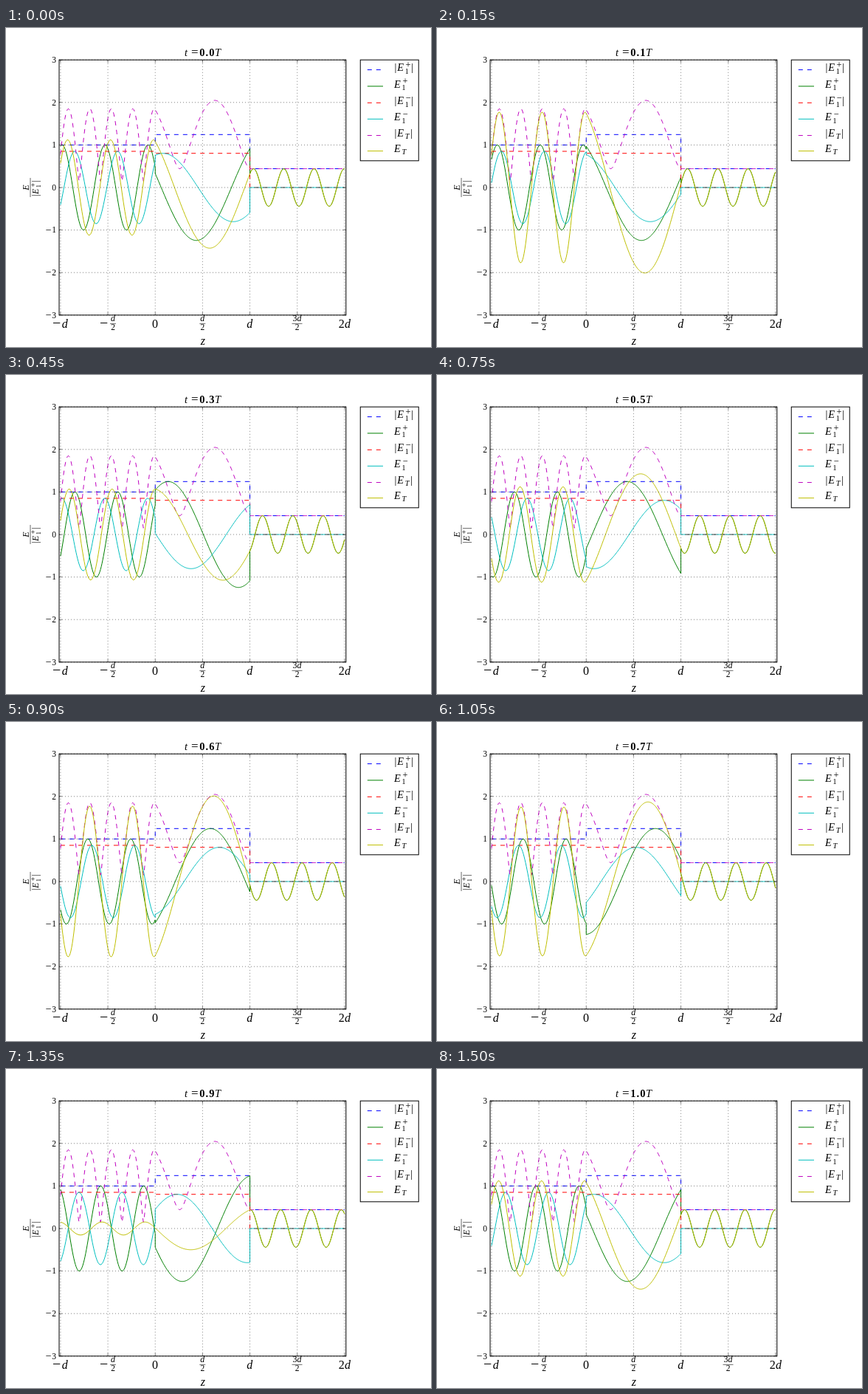
These frames come from a looping animation (576x432 px, 1.65 s). An HTML page:

```html
<!DOCTYPE html>
<html lang="en">
<head>
<meta charset="utf-8">
<title>Waves in three layers</title>
<style>
html, body { margin: 0; width: 100%; height: 100%; overflow: hidden; background: #fff; }
svg { display: block; }
text { font-family: "Liberation Serif", "Times New Roman", serif; fill: #000; }
.i { font-style: italic; }
.b { font-weight: bold; }
</style>
</head>
<body>
<svg id="stage" width="576" height="432" viewBox="0 0 576 432"></svg>
<script>
const stage = document.getElementById('stage');
const TAU = 2 * Math.PI;
const STEP = 150, STEPS = 11;

function add(tag, attrs, parent = stage) {
  const el = document.createElementNS('http://www.w3.org/2000/svg', tag);
  for (const k in attrs) el.setAttribute(k, attrs[k]);
  parent.appendChild(el);
  return el;
}
function text(x, y, str, size, cls = '', anchor = 'start', parent = stage) {
  const el = add('text', { x, y, 'font-size': size, class: cls, 'text-anchor': anchor }, parent);
  el.textContent = str;
  return el;
}
function stroke(d, color, width = 1, dash = 'none') {
  return add('path', { d, fill: 'none', stroke: color, 'stroke-width': width, 'stroke-dasharray': dash });
}

const px = z => 202.24 + 128.32 * z;
const py = v => 216 - 57.6 * v;

// Wave numbers of the layers and matching at z = 0 and z = d
const k1 = TAU * 2.206, k2 = 4.235, k3 = TAU * 3.126, phase = 0.745;
const r = k3 / k2, s = k1 / k2;
const C = Math.cos(k2), S = Math.sin(k2);
const wave = (re, im) => ({ a: Math.hypot(re, im), p: Math.atan2(im, re) + phase });
const layers = [
  { z: -1, ref: 0, k: k1,
    f: wave(C * (1 + r / s) / 2, S * (r + 1 / s) / 2),
    g: wave(C * (1 - r / s) / 2, S * (r - 1 / s) / 2) },
  { z: 0, ref: 1, k: k2, f: wave((1 + r) / 2, 0), g: wave((1 - r) / 2, 0) },
  { z: 1, ref: 1, k: k3, f: wave(1, 0), g: wave(0, 0) }
];
const unit = 1 / layers[0].f.a;

const fwd = (l, z, t) => unit * l.f.a * Math.cos(TAU * t - l.k * (z - l.ref) + l.f.p);
const back = (l, z, t) => unit * l.g.a * Math.cos(TAU * t + l.k * (z - l.ref) + l.g.p);
const total = (l, z, t) => fwd(l, z, t) + back(l, z, t);
const fwdAbs = l => unit * l.f.a;
const backAbs = l => unit * l.g.a;
const totalAbs = (l, z) => unit * Math.sqrt(Math.max(0, l.f.a ** 2 + l.g.a ** 2 +
  2 * l.f.a * l.g.a * Math.cos(2 * l.k * (z - l.ref) + l.g.p - l.f.p)));

function curve(fn, t, n = 128) {
  const pts = [];
  for (const l of layers) {
    for (let i = 0; i <= n; i++) {
      const z = l.z + i / n;
      pts.push(px(z).toFixed(2) + ' ' + py(fn(l, z, t)).toFixed(2));
    }
  }
  return 'M' + pts.join('L');
}

const BLUE = '#00f', GREEN = '#008000', RED = '#f00';
const CYAN = '#00bfbf', MAGENTA = '#bf00bf', YELLOW = '#bfbf00';
const moving = [];
const live = (fn, color) => moving.push({ fn, el: stroke('', color) });
const still = (fn, color, n) => stroke(curve(fn, 0, n), color, 1, '6 6');

add('rect', { width: 576, height: 432, fill: '#fff' });
still(fwdAbs, BLUE, 1);
live(fwd, GREEN);
still(backAbs, RED, 1);
live(back, CYAN);
still(totalAbs, MAGENTA);
live(total, YELLOW);

// Grid, ticks and frame
const L = 72, R = 460.8, T = 43.2, B = 388.8;
for (let z = -1; z <= 2; z += 0.5) {
  const x = px(z);
  stroke(`M${x} ${B}V${T}`, '#000', 0.5, '1 3');
  stroke(`M${x} ${B}v-4M${x} ${T}v4`, '#000', 0.5);
}
for (let v = -3; v <= 3; v++) {
  const y = py(v);
  stroke(`M${L} ${y}H${R}`, '#000', 0.5, '1 3');
  stroke(`M${L} ${y}h4M${R} ${y}h-4`, '#000', 0.5);
  text(68, y + 3.8, Math.abs(v), 11.5, '', 'end');
  if (v < 0) text(57.6, y + 4.2, '−', 14, '', 'middle');
}
add('rect', { x: L, y: T, width: R - L, height: B - T, fill: 'none', stroke: '#000' });

// Labels below
function fraction(x, num, half) {
  const top = text(x, 397.3, num, 12, '', 'middle');
  add('tspan', { class: 'i' }, top).textContent = 'd';
  text(x, 409.3, '2', 11.5, '', 'middle');
  stroke(`M${x - half} 400.3h${2 * half}`, '#000', 0.6);
}
text(63, 406, '−', 20);
text(75.8, 405.6, 'd', 16, 'i');
text(127, 406, '−', 20);
fraction(145, '', 4);
text(202, 405.6, '0', 16, '', 'middle');
fraction(266.3, '', 4);
text(330.2, 405.6, 'd', 16, 'i', 'middle');
fraction(394.5, '3', 7);
text(450.7, 405.6, '2', 16);
text(459, 405.6, 'd', 16, 'i');
text(266.8, 429, 'z', 16, 'i', 'middle');

// Field symbol with optional bars, superscript and subscript
function field(x, y, size, bars, sup, sub, parent) {
  const u = size / 14.4;
  const bar = at => text(at, y, '|', size, '', 'middle', parent);
  if (bars) { bar(x + 2 * u); x += 4.2 * u; }
  text(x, y, 'E', size, 'i', 'start', parent);
  const end = x + 10.6 * u;
  if (sup) {
    text(end + 0.8 * u, y - 4.6 * u, sup, 12.5 * u, '', 'start', parent);
    text(end, y + 3.6 * u, sub, 10 * u, '', 'start', parent);
  } else {
    text(end, y + 2.4 * u, sub, 10.5 * u, 'i', 'start', parent);
  }
  if (bars) bar(end + (sup ? 10 : 9) * u);
}

const side = add('g', { transform: 'translate(31 216) rotate(-90)' });
text(0, 0, 'E', 12, 'i', 'middle', side);
add('path', { d: 'M-13 2h26', stroke: '#000', 'stroke-width': 0.6 }, side);
field(-12.5, 12.8, 12, true, '+', '1', side);

// Legend
add('rect', { x: 480.24, y: T, width: 79, height: 136.6, fill: '#fff', stroke: '#000' });
[
  [56.6, BLUE, true, '+', '1'],
  [78.9, GREEN, false, '+', '1'],
  [101.3, RED, true, '−', '1'],
  [123.3, CYAN, false, '−', '1'],
  [145.5, MAGENTA, true, '', 'T'],
  [166.6, YELLOW, false, '', 'T']
].forEach(([y, color, bars, sup, sub]) => {
  stroke(`M489.8 ${y}h21.2`, color, 1, bars ? '6 6' : 'none');
  field(526, y + 1.8, 14.4, bars, sup, sub);
});

// Title
text(242, 38, 't', 14.4, 'i');
text(251, 38, '=', 17);
const clock = text(0, 38, '', 14.4, 'b');
clock.setAttribute('x', '262.2 270.4 275.2');
text(283, 38, 'T', 14.4, 'i');

let shown = -1;
function show(n) {
  if (n === shown) return;
  shown = n;
  const t = n / 10;
  clock.textContent = t.toFixed(1);
  for (const m of moving) m.el.setAttribute('d', curve(m.fn, t));
}
show(0);
const start = performance.now();
function tick() {
  const ms = Math.max(0, performance.now() - start);
  show(Math.floor(ms / STEP) % STEPS);
  requestAnimationFrame(tick);
}
requestAnimationFrame(tick);
</script>
</body>
</html>
```
